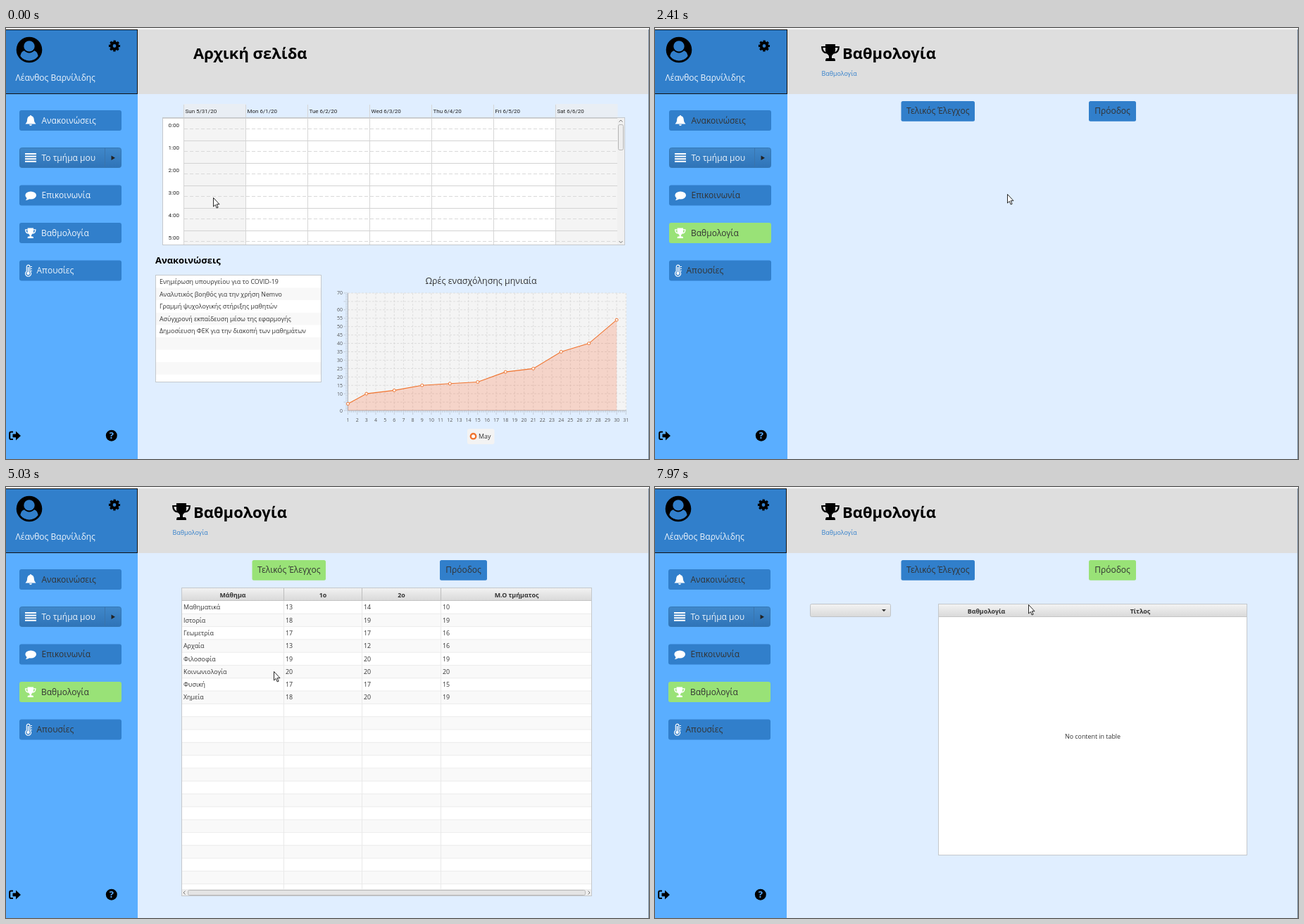
Recreate the animation shown at these times as an HTML page. Size 913 by 613 pixels, loop 8 s.

```html
<!DOCTYPE html>
<html lang="el">
<head>
<meta charset="utf-8">
<title>Σχολική πύλη</title>
<style>
html, body { margin: 0; width: 100%; height: 100%; overflow: hidden; background: #e0eeff; }
svg { display: block; width: 913px; height: 613px; }
text { font: 8.9px "Open Sans", "Noto Sans", sans-serif; fill: #333; white-space: pre; }
.title { font-size: 22px; font-weight: 700; fill: #000; }
.heading { font-size: 13px; font-weight: 700; fill: #000; }
.menu { font-size: 12px; }
.light { fill: #eef5fc; }
.bold { font-weight: 700; }
.cal { font: 8px Roboto, sans-serif; fill: #222; }
.axis { font-size: 7px; fill: #555; }
.mid { text-anchor: middle; }
.end { text-anchor: end; }
</style>
</head>
<body>
<svg id="stage" viewBox="0 0 913 613" xmlns="http://www.w3.org/2000/svg"></svg>
<script>
const BLUE = '#317fcb', GREEN = '#99e277', ORANGE = '#f0742f';
const LOOP = 8000, OPEN_GRADES = 1560, OPEN_FINAL = 4110, OPEN_PROGRESS = 7500;

const rect = (x, y, w, h, fill, extra = '') =>
  `<rect x="${x}" y="${y}" width="${w}" height="${h}" fill="${fill}" ${extra}/>`;
const text = (x, y, s, cls = '', extra = '') => `<text x="${x}" y="${y}" class="${cls}" ${extra}>${s}</text>`;
const path = (d, fill = 'none', extra = '') => `<path d="${d}" fill="${fill}" ${extra}/>`;
const line = (d, color, extra = '') => path(d, 'none', `stroke="${color}" ${extra}`);
const group = (id, body, extra = '') => `<g id="${id}" ${extra}>${body}</g>`;
const range = (n, f) => Array.from({ length: n }, (_, i) => f(i)).join('');

const trophy = (x, y, scale, color) => `<g transform="translate(${x} ${y}) scale(${scale})">` +
  path('M6 0H20V9C20 13 16 14 15 17V20H18Q20 20 20 24H6Q6 20 8 20H11V17C10 14 6 13 6 9Z', color) +
  line('M6 4H1.2C1.2 9 4 12 8 12.5M20 4H24.8C24.8 9 22 12 18 12.5', color, 'stroke-width="2.2"') + '</g>';

function sidebar() {
  const button = (y, x, label, id) =>
    rect(19, y, 145, 29, BLUE, `rx="3" ${id ? `id="${id}"` : ''}`) + text(x, y + 18.5, label, 'menu label');
  const user = '<g transform="translate(33 31)"><circle r="18.3"/>' +
    `<circle cy="-5.1" r="7.7" fill="${BLUE}"/>` +
    path('M12.6 8.9C12 4 9 1.6 7.1 1.3A9.6 9.6 0 0 1-7.1 1.3C-9 1.6-12 4-12.6 8.9A15.4 15.4 0 0 0 12.6 8.9Z', BLUE) + '</g>';
  const gear = '<g transform="translate(154 25.5)" fill="none" stroke="#000">' +
    '<circle r="4.4" stroke-width="4"/><circle r="6.6" stroke-width="3" stroke-dasharray="3 2.184" stroke-dashoffset="1.5"/></g>';
  const bell = path('M35 124Q36 124 36 125C39.5 126 39.8 129 40 132Q40.3 134.5 42.5 136.5H27.5Q29.7 134.5 30 132C30.2 129 30.5 126 34 125Q34 124 35 124ZM33 137.3H37Q36.8 139 35 139T33 137.3Z', '#fff');
  const bubble = '<ellipse cx="35.2" cy="238" rx="7.8" ry="5.6" fill="#fff"/>' + path('M29.5 240Q30 243.5 27.5 245Q32 245 34 242Z', '#fff');
  const thermometer = line('M29.3 346V339.5A2.3 2.3 0 0 1 33.9 339.5V346A4 4 0 1 1 29.3 346Z', '#fff', 'stroke-width="1.2"') +
    line('M31.6 340V349', '#fff', 'stroke-width="1.5"') + '<circle cx="31.6" cy="349" r="2.2" fill="#fff"/>' +
    line('M35 339.5H37M35 342.5H37M35 345.5H37', '#fff');
  const exit = line('M10 574.5H7Q5.2 574.5 5.2 576.5V583Q5.2 585 7 585H10', '#000', 'stroke-width="2"') +
    path('M9.5 577.5H14V573.5L21 580L14 586.5V582.3H9.5Z', '#000');
  const help = '<circle cx="149.8" cy="579.7" r="8"/>' +
    text(149.8, 584.2, '?', 'mid bold', 'style="font-size:13px;fill:#5aaeff"');

  return rect(-2, 2, 189, 611, '#5aaeff') + rect(-1.5, 2.5, 188, 91, BLUE, 'stroke="#111"') +
    user + gear + text(13.5, 75, 'Λέανθος Βαρνίλιδης', 'menu light') +
    button(117, 50.5, 'Ανακοινώσεις') + bell +
    rect(19.5, 170.5, 144, 28, 'url(#menuFill)', 'rx="3" stroke="#3478b7"') +
    text(50.5, 188.8, 'Το τμήμα μου', 'menu light') + line('M140.5 171V198', '#3a74ac') +
    range(4, i => rect(27, 178 + i * 3.6, 16, 2, '#fff')) + path('M149.5 181.5L155 184.8L149.5 188Z', '#222') +
    button(223.5, 50.5, 'Επικοινωνία') + bubble +
    button(277, 50, 'Βαθμολογία', 'gradesButton') + trophy(27, 284.5, .6, '#fff') +
    button(330.5, 43.5, 'Απουσίες') + thermometer + exit + help;
}

function calendar() {
  const days = ['Sun 5/31/20', 'Mon 6/1/20', 'Tue 6/2/20', 'Wed 6/3/20', 'Thu 6/4/20', 'Fri 6/5/20', 'Sat 6/6/20'];
  const colX = i => 252.5 + i * 88;
  let s = rect(222, 127, 657, 182, '#fff');
  for (const i of [0, 6]) s += rect(colX(i), 108, 88, 19, '#e9eef4') + rect(colX(i), 128, 88, 181, '#f4f4f4');
  s += days.map((d, i) => text(colX(i) + 2, 121, d, 'cal') + line(`M${colX(i)} 109V309`, '#d6d6d6')).join('');
  for (let h = 0; h < 6; h++) {
    const y = 128.5 + h * 32;
    s += text(246, y + 12, `${h}:00`, 'cal end') +
      line(`M${h ? 252 : 222} ${y}H868`, '#d3d3d3') +
      line(`M253 ${y + 15}H868`, '#d9d9d9', 'stroke-dasharray="5 3"');
  }
  return s + rect(868, 128, 11, 181, '#f0f0f0') +
    rect(869.5, 137.5, 7, 36, '#eee', 'rx="2" stroke="#b5b5b5"') +
    line('M870.5 133.5L873 131L875.5 133.5M870.5 303L873 305.5L875.5 303', '#777') +
    rect(222.5, 127.5, 656, 181, 'none', 'stroke="#c4c8cc"');
}

function newsList() {
  const items = ['Ενημέρωση υπουργείου για το COVID-19', 'Αναλυτικός βοηθός για την χρήση Nemvo',
    'Γραμμή ψυχολογικής στήριξης μαθητών', 'Ασύγχρονή εκπαίδευση μέσω της εφαρμογής',
    'Δημοσίευση ΦΕΚ για την διακοπή των μαθημάτων'];
  return text(212, 335, 'Ανακοινώσεις', 'heading') + rect(212.5, 351.5, 235, 152, '#fff', 'stroke="#c5c9cd"') +
    range(4, i => rect(213, 369.6 + i * 35.2, 234, 17.6, '#f8f8f8')) +
    items.map((s, i) => text(218, 364 + i * 17.6, s)).join('');
}

function chart() {
  const px = d => 485.5 + (d - 1) * 13.16, py = v => 544 - v * 2.386;
  const data = [[1, 4], [3, 10], [6, 12], [9, 15], [12, 16], [15, 17], [18, 23], [21, 25], [24, 35], [27, 40], [30, 54]];
  const curve = 'M' + data.map(([d, v]) => `${px(d)} ${py(v)}`).join('L');
  let grid = '', ticks = '', labels = '';
  for (let d = 1; d <= 31; d++) {
    grid += `M${px(d)} 377V544`;
    ticks += `M${px(d)} 544V550`;
    labels += text(px(d), 560, d, 'axis mid');
    if (d < 31) for (let k = 1; k < 5; k++) ticks += `M${px(d + k / 5)} 544V547`;
  }
  for (let v = 0; v <= 70; v++) {
    const major = v % 5 === 0;
    ticks += `M485 ${py(v)}H${major ? 479.5 : 482}`;
    if (major) grid += `M485 ${py(v)}H880`;
    if (major && v !== 5 && v !== 65) labels += text(478, py(v) + 2.5, v, 'axis end');
  }
  return text(674.5, 364, 'Ωρές ενασχόλησης μηνιαία', 'mid', 'style="font-size:12.4px"') +
    rect(485, 377, 396, 167, '#f4f4f4') + line(grid, '#d9d9d9', 'stroke-width=".8" stroke-dasharray="3 2"') +
    line(ticks, '#b0b5bc', 'stroke-width=".6"') + line('M485.5 377V544H881', '#b0b5bc') + labels +
    path(`${curve}V544H${px(1)}Z`, '#f3622d', 'fill-opacity=".22"') + line(curve, ORANGE, 'stroke-width="1.1"') +
    data.map(([d, v]) => `<circle cx="${px(d)}" cy="${py(v)}" r="2" fill="#fff" stroke="${ORANGE}"/>`).join('') +
    rect(655, 570, 38.5, 22, '#f3f3f3', 'rx="3"') +
    `<circle cx="663.5" cy="580.7" r="3.7" fill="#fff" stroke="${ORANGE}" stroke-width="2.4"/>` + text(671, 584, 'May');
}

function finalTable() {
  const cols = [249, 394, 505, 617, 832], rowH = 18.3;
  const heads = ['Μάθημα', '1ο', '2ο', 'Μ.Ο τμήματος'];
  const rows = ['Μαθηματικά 13 14 10', 'Ιστορία 18 19 19', 'Γεωμετρία 17 17 16', 'Αρχαία 13 12 16',
    'Φιλοσοφία 19 20 19', 'Κοινωνιολογία 20 20 20', 'Φυσική 17 17 15', 'Χημεία 18 20 19'];
  return rect(249, 143, 583, 439, '#fff') +
    range(11, i => rect(249, 162 + (2 * i + 1) * rowH, 583, rowH, '#f9f9f9')) +
    range(22, i => line(`M249 ${162 + (i + 1) * rowH}H832`, '#ececec')) +
    rect(249, 143, 583, 18.5, 'url(#headFill)') + line('M249 161.5H832', '#c4c4c4') +
    cols.slice(1, 4).map(x => line(`M${x + .5} 162V572`, '#e9e9e9') + line(`M${x + .5} 144V161`, '#bdbdbd')).join('') +
    heads.map((s, i) => text((cols[i] + cols[i + 1]) / 2 + .5, 156.5, s, 'mid bold')).join('') +
    rows.map((r, j) => r.split(' ').map((s, i) => text(cols[i] + 3, 174.3 + j * rowH, s)).join('')).join('') +
    rect(249, 572, 583, 10, '#ededed') + rect(258.5, 573.5, 564, 7, '#e4e4e4', 'rx="2" stroke="#b8b8b8"') +
    line('M254.5 574.5L252 577L254.5 579.5M826.5 574.5L829 577L826.5 579.5', '#777') +
    rect(249.5, 143.5, 582, 438, 'none', 'stroke="#c4c8cc"');
}

function progressTable() {
  return rect(220.5, 166.5, 114, 18, 'url(#headFill)', 'rx="2" stroke="#bfc3c7"') + path('M322 174H328L325 177.3Z', '#333') +
    rect(402.5, 166.5, 438, 357, '#fff', 'stroke="#c4c8cc"') +
    rect(403, 167, 437, 17.5, 'url(#headFill)') + line('M403 184.5H840', '#c4c4c4') +
    text(470.5, 179.5, 'Βαθμολογία', 'mid bold') + text(689, 179.5, 'Τίτλος', 'mid bold') +
    text(621.5, 358, 'No content in table', 'mid');
}

const tab = (id, x, w, label) =>
  rect(x, 104, w, 28.7, BLUE, `id="${id}" rx="2.5"`) + text(x + w / 2, 122.3, label, 'menu mid');

const gradient = (id, top, bottom) => `<linearGradient id="${id}" x2="0" y2="1">` +
  `<stop stop-color="${top}"/><stop offset="1" stop-color="${bottom}"/></linearGradient>`;

const stage = document.getElementById('stage');
stage.innerHTML = `<defs>${gradient('menuFill', '#4088ca', '#2f74b8')}${gradient('headFill', '#f3f3f3', '#d9d9d9')}</defs>` +
  rect(0, 0, 913, 613, '#e0eeff') + rect(0, 0, 913, 2, '#f7f7f7') + rect(187, 2, 726, 92, '#dedede') +
  group('sidebar', sidebar()) +
  group('home', text(266, 44, 'Αρχική σελίδα', 'title') + calendar() + newsList() + chart()) +
  group('grades', trophy(236, 23, 1, '#000') + text(266, 44, 'Βαθμολογία', 'title') +
    text(236.5, 68, 'Βαθμολογία', '', `style="fill:${BLUE}"`) +
    tab('finalTab', 349.5, 104.5, 'Τελικός Έλεγχος') + tab('progressTab', 616, 67, 'Πρόοδος')) +
  group('finalView', finalTable()) + group('progressView', progressTable()) +
  line('M912.5 2V613', '#7d8fa3') +
  group('arrow', path('M.5 .5V13L3.3 10.4L5.2 15L7.1 14.2L5.2 9.7H9Z', '#fff', 'stroke="#111" stroke-width=".9"')) +
  group('hand', path('M-1.6 1.4Q0-.6 1.6 1.4V6.5Q3 6 3.8 7.2Q5.2 6.6 6 8Q8 8 8 10V13Q7.8 15.5 6.5 17.8H-1Q-2 15-4.8 11Q-4.6 9-2.8 10.2L-1.6 11.5Z', '#fff', 'stroke="#111"') +
    line('M1.6 6.5V10M3.8 7.4V10M6 8.2V10.5', '#111', 'stroke-width=".8"'));

const el = id => document.getElementById(id);
const show = (id, on) => el(id).setAttribute('visibility', on ? 'visible' : 'hidden');
const fill = (id, color) => el(id).setAttribute('fill', color);
const labels = [...document.querySelectorAll('.label')];

// Pointer moves: start, end, number of steps, evenly timed waypoints.
const moves = [
  [540, 1250, 10, [[294, 241], [117, 290]]],
  [2100, 2870, 11, [[116, 289], [420, 255], [518, 232], [505, 150], [431, 95]]],
  [2950, 3330, 6, [[431, 95], [402, 118], [406, 115]]],
  [4340, 5110, 11, [[406, 115], [427, 190], [400, 250], [356, 276]]],
  [5180, 5800, 9, [[356, 276], [470, 178], [400, 300], [262, 360]]],
  [5950, 6730, 11, [[262, 360], [303, 370], [620, 260], [845, 87], [650, 115]]],
  [6810, 6890, 2, [[650, 115], [639, 128]]],
  [7040, 7120, 2, [[639, 128], [643, 120]]],
  [7900, 7970, 2, [[643, 120], [530, 167]]]
];

function pointer(t) {
  const [start, end, steps, points] = moves.filter(m => m[0] <= t).pop() || moves[0];
  const step = Math.floor((t - start) / (end - start) * (steps - 1) + 1e-6) + 1;
  const u = Math.min(Math.max(step / steps, 0), 1) * (points.length - 1);
  const i = Math.min(Math.floor(u), points.length - 2);
  return points[i].map((v, k) => v + (points[i + 1][k] - v) * (u - i));
}

function render(t) {
  const home = t < OPEN_GRADES, final = t >= OPEN_FINAL && t < OPEN_PROGRESS, progress = t >= OPEN_PROGRESS;
  show('home', home);
  show('grades', !home);
  show('finalView', final);
  show('progressView', progress);
  el('sidebar').setAttribute('transform', `translate(${!home && t < OPEN_FINAL ? 1 : 0})`);
  labels.forEach(l => l.classList.toggle('light', home));
  fill('gradesButton', home ? BLUE : GREEN);
  fill('finalTab', final ? GREEN : BLUE);
  fill('progressTab', progress ? GREEN : BLUE);

  const [x, y] = pointer(t), overMenu = home && x < 164;
  show('arrow', !overMenu);
  show('hand', overMenu);
  el(overMenu ? 'hand' : 'arrow').setAttribute('transform', `translate(${Math.round(x)} ${Math.round(y)})`);
}

function tick() {
  render(performance.now() % LOOP);
  requestAnimationFrame(tick);
}
tick();
</script>
</body>
</html>
```
